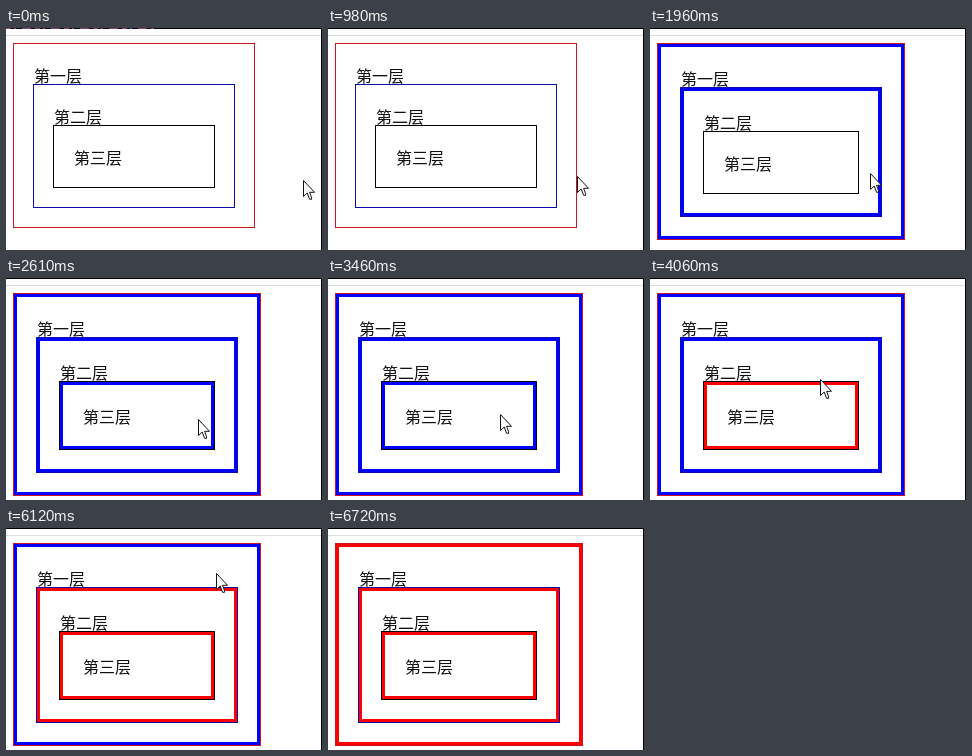
An HTML page that plays this animation: 316 px wide and 222 px high, repeating every 7380 ms.

```html
<!DOCTYPE html>
<html lang="zh-CN">
<head>
<meta charset="utf-8">
<title>Nested layers</title>
<style>
  html, body { margin: 0; width: 100%; height: 100%; overflow: hidden; background: #fff; }
  svg { display: block; width: 316px; height: 222px; }
  text { font: 16px "Noto Sans CJK SC", "Noto Sans CJK", sans-serif; fill: #111; }
</style>
</head>
<body>
<svg viewBox="0 0 316 222">
  <rect width="316" height="222" fill="#fff"/>
  <path d="M0 7.5H315" stroke="#dcdcdc"/>
  <path d="M0 .5H316M315.5 0V222" stroke="#000"/>
  <path id="marks" d="M0 .5H148" stroke="#8a3f78" stroke-dasharray="5 3 2 6 9 4"/>
  <g id="layers"></g>
  <path id="cursor" d="M.5 .5V16.5L4.2 13L6.6 19.3H8.6V17.8L6.6 12.3H11.5Z" fill="#fff" stroke="#111"/>
</svg>
<script>
const LOOP = 7380, STEP = 140 / 3, CURSOR_GONE = 6715;

// enter: pointer comes in, blue frame; leave: pointer goes out, red frame
const layers = [
  { label: '第一层', edge: '#cc1420', enter: 1020, leave: 6385 },
  { label: '第二层', edge: '#0c0ca8', enter: 1950, leave: 5360 },
  { label: '第三层', edge: '#000', enter: 2605, leave: 4010 }
];

// pointer path: [ms, x, y]
const path = [
  [607, 297, 152], [980, 249, 148], [1120, 240, 147],
  [1867, 240, 147], [1960, 220, 145], [2100, 212, 144],
  [2520, 212, 144], [2707, 172, 137], [3407, 172, 137],
  [3453, 172, 136], [4060, 170, 101], [4153, 170, 96],
  [4200, 170, 96], [4480, 170, 89], [5040, 170, 89],
  [5320, 174, 62], [5507, 180, 45], [5647, 180, 45],
  [5740, 180, 44], [5930, 180, 44], [6300, 240, 47],
  [6390, 256, 48], [6440, 259, 48], [6530, 259, 48], [6673, 298, 66]
];

const byId = id => document.getElementById(id);

function add(tag, attrs) {
  const node = document.createElementNS('http://www.w3.org/2000/svg', tag);
  set(node, attrs);
  return byId('layers').appendChild(node);
}

function set(node, attrs) {
  for (const key in attrs) node.setAttribute(key, attrs[key]);
}

for (const layer of layers) {
  layer.frame = add('rect', { fill: 'none', 'stroke-width': 3 });
  layer.outline = add('rect', { fill: 'none', stroke: layer.edge });
  layer.text = add('text', {});
  layer.text.textContent = layer.label;
}

function pointerAt(t) {
  const i = path.findIndex(key => key[0] > t);
  if (i === 0) return path[0].slice(1);
  if (i < 0) return path[path.length - 1].slice(1);
  const [t0, x0, y0] = path[i - 1], [t1, x1, y1] = path[i];
  const k = (t - t0) / (t1 - t0);
  return [Math.round(x0 + (x1 - x0) * k), Math.round(y0 + (y1 - y0) * k)];
}

function inset(x, y, w, h, d) {
  return { x: x + d, y: y + d, width: w - 2 * d, height: h - 2 * d };
}

function drawLayers(t) {
  const extra = layers.map(layer => t >= layer.enter ? 3 : 0);
  let x = 7, y = 15, w = 242 + 2 * extra[0];
  layers.forEach((layer, i) => {
    const grow = extra[i];
    const h = 185 - 61 * i + 2 * extra.slice(i).reduce((a, b) => a + b, 0);
    set(layer.outline, inset(x, y, w, h, 0.5));
    set(layer.frame, inset(x, y, w, h, 2.5));
    set(layer.frame, { stroke: !grow ? 'none' : t >= layer.leave ? '#f00' : '#00f' });
    set(layer.text, { x: x + 21 + grow, y: y + 39 + grow });
    x += 20 + grow;
    y += 41 + grow;
    w -= 40 + 2 * grow;
  });
}

function draw(time) {
  const t = Math.floor((time % LOOP + 6) / STEP) * STEP;
  drawLayers(t);
  const [x, y] = pointerAt(t);
  set(byId('cursor'), {
    transform: `translate(${x} ${y})`,
    visibility: t < CURSOR_GONE ? 'visible' : 'hidden'
  });
  set(byId('marks'), { opacity: Math.max(0, 1 - t / 180) });
}

const start = performance.now();
function tick() {
  draw(performance.now() - start);
  requestAnimationFrame(tick);
}
tick();
</script>
</body>
</html>
```
